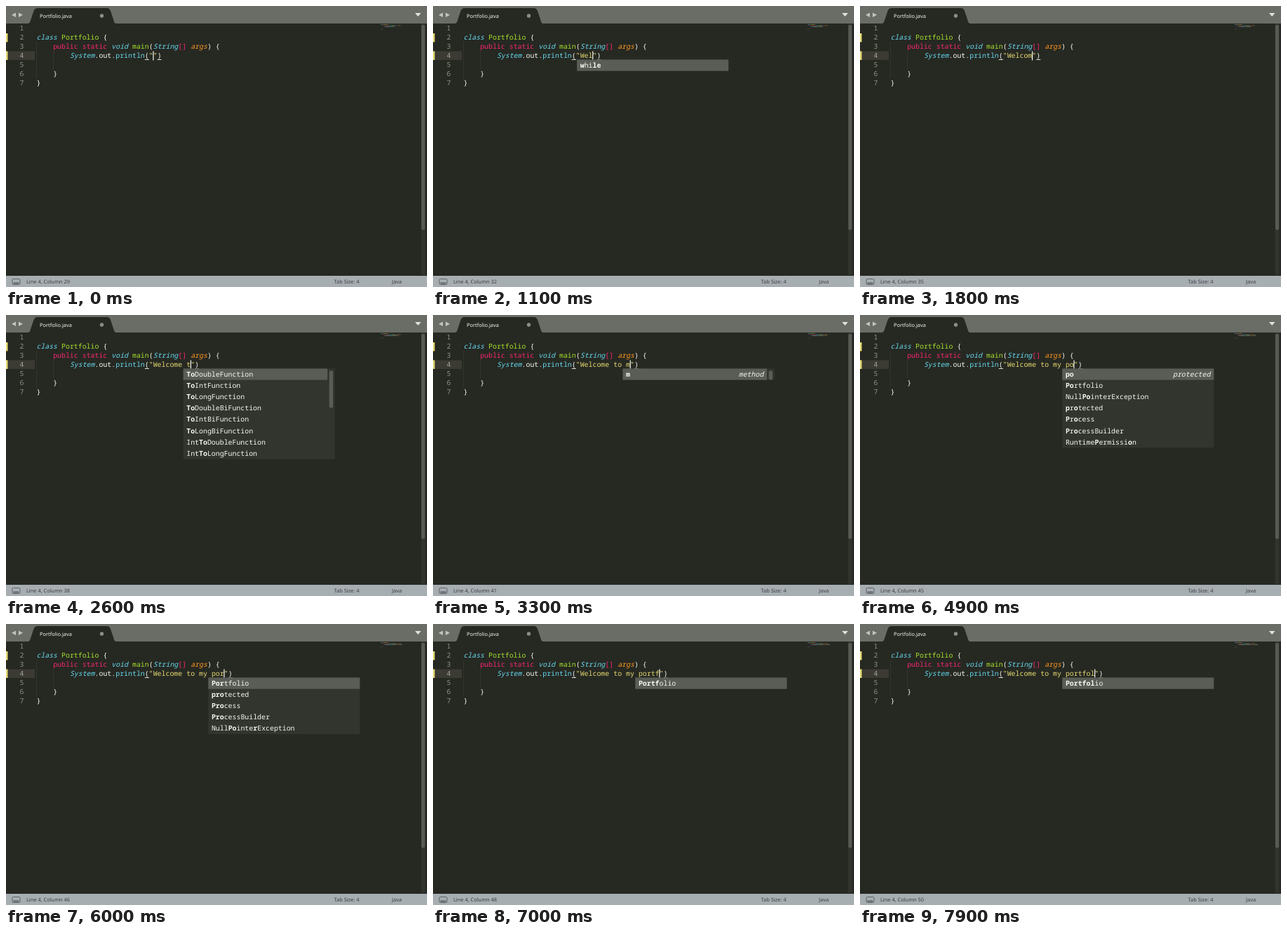
An HTML page for the animation above (8000 ms loop, 600 px wide and 401 px high).

```html
<!DOCTYPE html>
<html lang="en">
<head>
<meta charset="utf-8">
<title>Code editor</title>
<style>
html, body { margin: 0; width: 100%; height: 100%; overflow: hidden; background: #262822; }
svg { display: block; width: 100%; height: 100%; }
text { white-space: pre; text-rendering: geometricPrecision; }
.code { font: 9.9px "Noto Sans Mono", "DejaVu Sans Mono", monospace; }
.ui { font: 7.4px "Noto Sans", "Open Sans", sans-serif; }
.i { font-style: italic; }
.b { font-weight: 700; }
</style>
</head>
<body>
<svg viewBox="0 0 600 401">
  <rect width="600" height="25" fill="#6a6c66"/>
  <path d="M31 25C34 25 34.500 22 35.500 19L39.500 7Q41 3 45 3H144Q147.500 3 149 7L153 19C154 22 154.500 25 157 25Z" fill="#262822"/>
  <path d="M14 9.500V16L8 12.700ZM18 9.500V16L24 12.700Z" fill="#c3c4c0"/>
  <path d="M583 10H591.500L587.200 15Z" fill="#e2e3e0"/>
  <circle cx="136.500" cy="14" r="2.700" fill="#8b8d87"/>
  <text class="ui" x="48" y="16.800" fill="#f4f4f0">Portfolio.java</text>

  <rect x="591.500" y="25" width="6" height="359" fill="#31332d"/>
  <rect x="592" y="27" width="5" height="292.500" rx="2" fill="#585a54"/>

  <rect y="64.500" width="41" height="12.500" fill="#3b3b33"/>
  <path d="M0 39H2.500V51.500H0ZM0 64.500H2.500V77H0Z" fill="#e6db74"/>
  <path d="M43.500 52V103M67.500 65V91" stroke="#3d3f38" stroke-dasharray="1 1"/>

  <g id="map"></g>
  <g id="code"></g>
  <rect id="caret" y="64.500" width="1.200" height="13" fill="#f8f8f0"/>
  <g id="popup"></g>

  <rect y="385" width="600" height="16" fill="#a7aeb2"/>
  <rect x="9" y="389.500" width="11" height="8" rx="1.500" fill="none" stroke="#5d6367"/>
  <rect x="10.500" y="394.500" width="8" height="2" fill="#5d6367"/>
  <g class="ui" fill="#3a3e41">
    <text id="pos" x="29" y="396"></text>
    <text x="467.500" y="396">Tab Size: 4</text>
    <text x="550" y="396">Java</text>
  </g>
</svg>
<script>
const LOOP = 8000, CHAR = 5.94, LEFT = 43.4, LINE = 13, ROW = 16.13, POP_Y = 76.5, POP_W = 216;
const MESSAGE = 'Welcome to my portfol', FIRST_COL = 28;
const WHITE = '#f8f8f2', CYAN = '#66d9ef', GREEN = '#a6e22e', PINK = '#f92672',
      ORANGE = '#fd971f', YELLOW = '#e6db74';

// When each key of MESSAGE is pressed, in ms.
const KEYS = [400, 700, 1000, 1300, 1500, 1700, 1900, 2200, 2500, 2800, 3100,
              3300, 3500, 3800, 4600, 4900, 5700, 6200, 7000, 7300, 7600];

const FUNCTIONS = ['*To*DoubleFunction', '*To*IntFunction', '*To*LongFunction', '*To*DoubleBiFunction',
                   '*To*IntBiFunction', '*To*LongBiFunction', 'Int*To*DoubleFunction', 'Int*To*LongFunction'];
const PO = ['*po*', '*Po*rtfolio', 'Null*Po*interException', '*p*r*o*tected', '*P*r*o*cess',
            '*P*r*o*cessBuilder', 'Runtime*P*ermissi*o*n'];
const POR = ['*Por*tfolio', '*pro*tected', '*Pro*cess', '*Pro*cessBuilder', 'Null*Po*inte*r*Exception'];

// Completion list by the word being typed; asterisks mark the matched letters.
const LISTS = {
  W: { rows: ['*w*hile'] },
  We: { rows: ['*w*hil*e*'] },
  Wel: { rows: ['*w*hi*le*'] },
  t: { rows: FUNCTIONS, thumb: 53 },
  to: { rows: FUNCTIONS, thumb: 53 },
  m: { rows: ['*m*'], hint: 'method', thumb: 13 },
  p: { rows: PO, hint: 'protected' },
  po: { rows: PO, hint: 'protected' },
  por: { rows: POR },
  port: { rows: ['*Port*folio'] },
  portf: { rows: ['*Portf*olio'] },
  portfo: { rows: ['*Portfo*lio'] },
  portfol: { rows: ['*Portfol*io'] }
};

const el = id => document.getElementById(id);
const rect = (x, y, w, h, fill, extra = '') =>
  `<rect x="${x}" y="${y}" width="${w}" height="${h}" fill="${fill}" ${extra}/>`;
const text = (x, y, str, fill, cls = '') =>
  `<text class="code ${cls}" x="${x}" y="${y}" fill="${fill}">${str}</text>`;
const colX = col => LEFT + col * CHAR;
const baseline = line => 22.4 + line * LINE;

// Each run: string, colour, optional style class.
const program = typed => [
  [],
  [['class', CYAN, 'i'], [' Portfolio', GREEN], [' {', WHITE]],
  [['    public static', PINK], [' void', CYAN, 'i'], [' main', GREEN], ['(', WHITE],
   ['String', CYAN, 'i'], ['[]', PINK], [' args', ORANGE, 'i'], [') {', WHITE]],
  [['        System', CYAN, 'i'], ['.out.', WHITE], ['println', CYAN], ['(', WHITE],
   [`"${typed}"`, YELLOW], [')', WHITE]],
  [],
  [['    }', WHITE]],
  [['}', WHITE]]
];

function drawCode(typed) {
  let code = '', map = '';
  program(typed).forEach((runs, i) => {
    const line = i + 1;
    code += text(19.6, baseline(line), line, line === 4 ? '#a3a49d' : '#8f908a');
    let col = 0;
    for (const [str, fill, cls] of runs) {
      for (const word of str.matchAll(/\S+/g)) {
        const at = col + word.index;
        code += text(colX(at), baseline(line), word[0], fill, cls);
        map += rect(534 + at * 0.65, 24.7 + i * 1.4, word[0].length * 0.65, 0.8, fill, 'opacity=".5"');
      }
      col += str.length;
    }
  });
  for (const col of [26, FIRST_COL + typed.length + 1])
    code += rect(colX(col), 76, CHAR, 0.9, WHITE);
  el('code').innerHTML = code;
  el('map').innerHTML = map;
}

function drawPopup(typed) {
  const word = typed.split(' ').pop(), list = LISTS[word];
  if (!list) return '';
  const x = colX(FIRST_COL + typed.length - word.length) - 4.6;
  const width = list.thumb ? POP_W - 10.5 : POP_W;
  let out = rect(x, POP_Y, POP_W, list.rows.length * ROW, '#32342e')
          + rect(x, POP_Y, width, ROW, '#5a5c56');
  list.rows.forEach((row, i) => {
    const y = POP_Y + i * ROW + 11.4;
    let col = 0;
    row.split('*').forEach((part, k) => {
      if (part) out += text(x + 4.6 + col * CHAR, y, part, WHITE, k % 2 ? 'b' : '');
      col += part.length;
    });
  });
  if (list.hint)
    out += text(x + width - 4.8 - list.hint.length * CHAR, POP_Y + 11.4, list.hint, WHITE, 'i');
  if (list.thumb)
    out += rect(x + width + 2.5, POP_Y + 3, 5.5, list.thumb, '#595b55', 'rx="2"');
  return out;
}

let shown = -1;
function render(now) {
  const t = now % LOOP;
  const count = KEYS.filter(k => k <= t).length;
  if (count !== shown) {
    shown = count;
    const typed = MESSAGE.slice(0, count);
    drawCode(typed);
    el('popup').innerHTML = drawPopup(typed);
    el('pos').textContent = `Line 4, Column ${FIRST_COL + count + 1}`;
    el('caret').setAttribute('x', colX(FIRST_COL + count) - 0.4);
  }
  const idle = t - (count ? KEYS[count - 1] : 0);
  el('caret').setAttribute('opacity', idle % 1000 < 500 ? 1 : 0);
}

const start = performance.now();
function tick() {
  render(performance.now() - start);
  requestAnimationFrame(tick);
}
tick();
</script>
</body>
</html>
```
